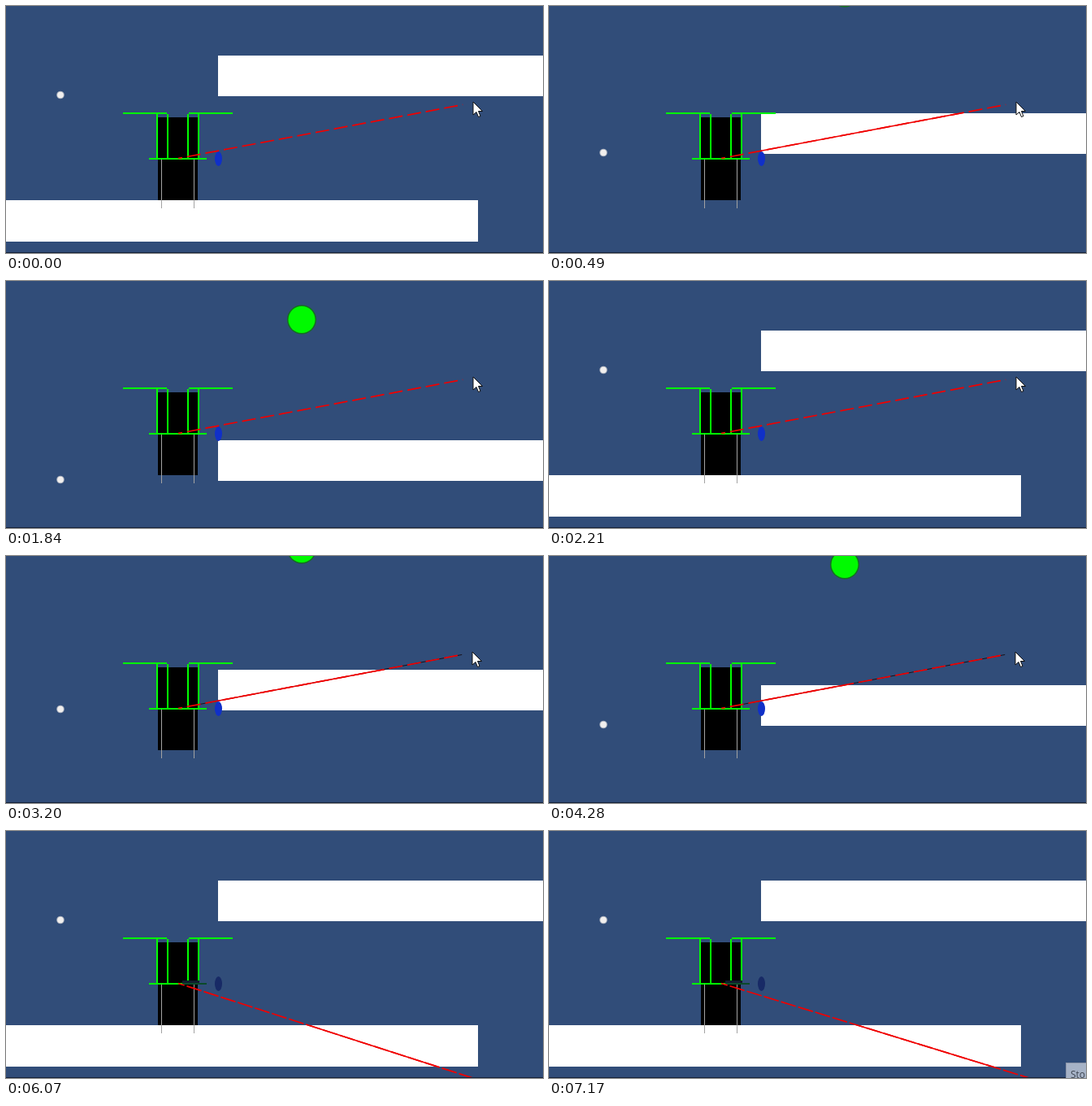
An HTML page with a canvas for the animation above (7190 ms loop, 661 px wide and 304 px high).

```html
<!DOCTYPE html>
<html lang="en">
<head>
<meta charset="utf-8">
<title>Platformer jump test</title>
<style>
  html, body { margin: 0; width: 100%; height: 100%; overflow: hidden; background: #314d79; }
  canvas { display: block; }
</style>
</head>
<body>
<canvas id="stage" width="661" height="304"></canvas>
<script>
const ctx = document.getElementById('stage').getContext('2d');
const LOOP = 7190;
const ORIGIN = { x: 212, y: 187.5 };

// Parabolas: height = pull * t * (duration - t), times in seconds
const HOP = { duration: 0.525, pull: 1175 };
const LEAP = { duration: 0.98, pull: 605 };
const JUMPS = [[125, HOP], [1220, LEAP], [2978, HOP], [4069, LEAP]];

// Pointer tip: time, x, y
const POINTER = [
  [0, 575, 118], [2970, 575, 118], [2990, 574, 118], [5100, 574, 118],
  [5170, 575, 120], [5300, 590, 145], [5490, 632, 205], [5630, 643, 325],
  [6070, 643, 325], [6360, 622, 322], [6520, 622, 322], [6650, 690, 318],
  [6780, 640, 318], [LOOP, 640, 318]
];

function jumpHeight(time) {
  for (const [start, { duration, pull }] of JUMPS) {
    const t = (time - start) / 1000;
    if (t > 0 && t < duration) return Math.round(pull * t * (duration - t));
  }
  return 0;
}

function pointerAt(time) {
  const next = POINTER.findIndex(key => key[0] > time);
  const [t0, x0, y0] = POINTER[next - 1];
  const [t1, x1, y1] = POINTER[next];
  const k = (time - t0) / (t1 - t0);
  return { x: Math.round(x0 + (x1 - x0) * k), y: Math.round(y0 + (y1 - y0) * k) };
}

function rect(color, x, y, w, h) {
  ctx.fillStyle = color;
  ctx.fillRect(x, y, w, h);
}

function oval(color, x, y, rx, ry = rx) {
  ctx.fillStyle = color;
  ctx.beginPath();
  ctx.ellipse(x, y, rx, ry, 0, 0, Math.PI * 2);
  ctx.fill();
}

function drawWorld(platforms, lift) {
  rect('#314d79', 0, 0, 661, 304);
  for (const box of platforms) rect('#fff', ...box);
  oval('#a9b0bd', 67, 109.5 + lift, 4.8);
  oval('#f1efee', 67, 109.5 + lift, 3.8);
  oval('#14701f', 364, lift - 87.5, 18);
  oval('#00fa00', 364, lift - 87.5, 16.5);
}

function drawBody(dimmed) {
  const green = '#00ff00';
  rect('#000', 187, 137, 49, 102);
  for (const x of [191, 231]) rect('#a3a3a3', x, 189, 1, 60);
  for (const x of [185, 198, 223, 236]) rect(green, x, 133, 2, 55);
  rect(green, 144, 131, 54, 2);
  rect(green, 225, 131, 54, 2);
  rect(green, 176, 187, 71, 2);
  if (dimmed) {
    rect('#101c2c', 217, 184, 21, 3);
    rect('#0b4a2a', 217, 187, 30, 2);
  }
  oval(dimmed ? '#182a66' : '#1030c8', 261.5, 188, 4.5, 9);
}

function aimLine(color, width, end, dash = []) {
  ctx.strokeStyle = color;
  ctx.lineWidth = width;
  ctx.setLineDash(dash);
  ctx.lineDashOffset = -11;
  ctx.beginPath();
  ctx.moveTo(ORIGIN.x, ORIGIN.y);
  ctx.lineTo(end.x, end.y);
  ctx.stroke();
  ctx.setLineDash([]);
}

function drawAim(time, tip, platforms) {
  const dx = tip.x - ORIGIN.x, dy = tip.y - ORIGIN.y;
  const k = 1 - 13 / Math.hypot(dx, dy);
  const end = { x: ORIGIN.x + dx * k, y: ORIGIN.y + dy * k + 1 };
  if (time >= 2990 && time < 5490) aimLine('#181018', 1, end);
  aimLine('#f00000', 1.7, end, time < 5490 ? [17, 6] : [19, 3]);

  // The line is unbroken where it crosses a platform
  ctx.save();
  ctx.beginPath();
  for (const box of platforms) ctx.rect(...box);
  ctx.clip();
  aimLine('#f00000', 1.6, end);
  ctx.restore();
}

function drawPointer({ x, y }) {
  const arrow = new Path2D('M0 0V16L4 12.5L6.5 18.5L9 17.5L6.5 11.5H11.5Z');
  ctx.save();
  ctx.translate(x, y);
  ctx.fillStyle = '#fff';
  ctx.fill(arrow);
  ctx.strokeStyle = '#111';
  ctx.lineWidth = 1;
  ctx.stroke(arrow);
  ctx.restore();
}

function drawTooltip(alpha) {
  ctx.save();
  ctx.globalAlpha = alpha;
  rect('#8993a6', 636, 285, 25, 19);
  rect('#a7b3c7', 637, 286, 24, 18);
  ctx.fillStyle = '#3c4350';
  ctx.font = '12px "Open Sans", "Noto Sans", sans-serif';
  ctx.fillText('Stop', 642, 304);
  ctx.restore();
}

function draw(time) {
  const lift = jumpHeight(Math.floor(time / 20) * 20);
  const tip = pointerAt(time);
  const platforms = [[261, 61 + lift, 400, 50], [0, 239 + lift, 581, 51]];
  drawWorld(platforms, lift);
  drawBody(time >= 5450);
  drawAim(time, tip, platforms);
  rect('#14213a', 0, 303, 661, 1);
  drawPointer(tip);
  if (time >= 7150) drawTooltip(time < 7170 ? 0.5 : 1);
}

function frame() {
  draw(performance.now() % LOOP);
  requestAnimationFrame(frame);
}
frame();
</script>
</body>
</html>
```
